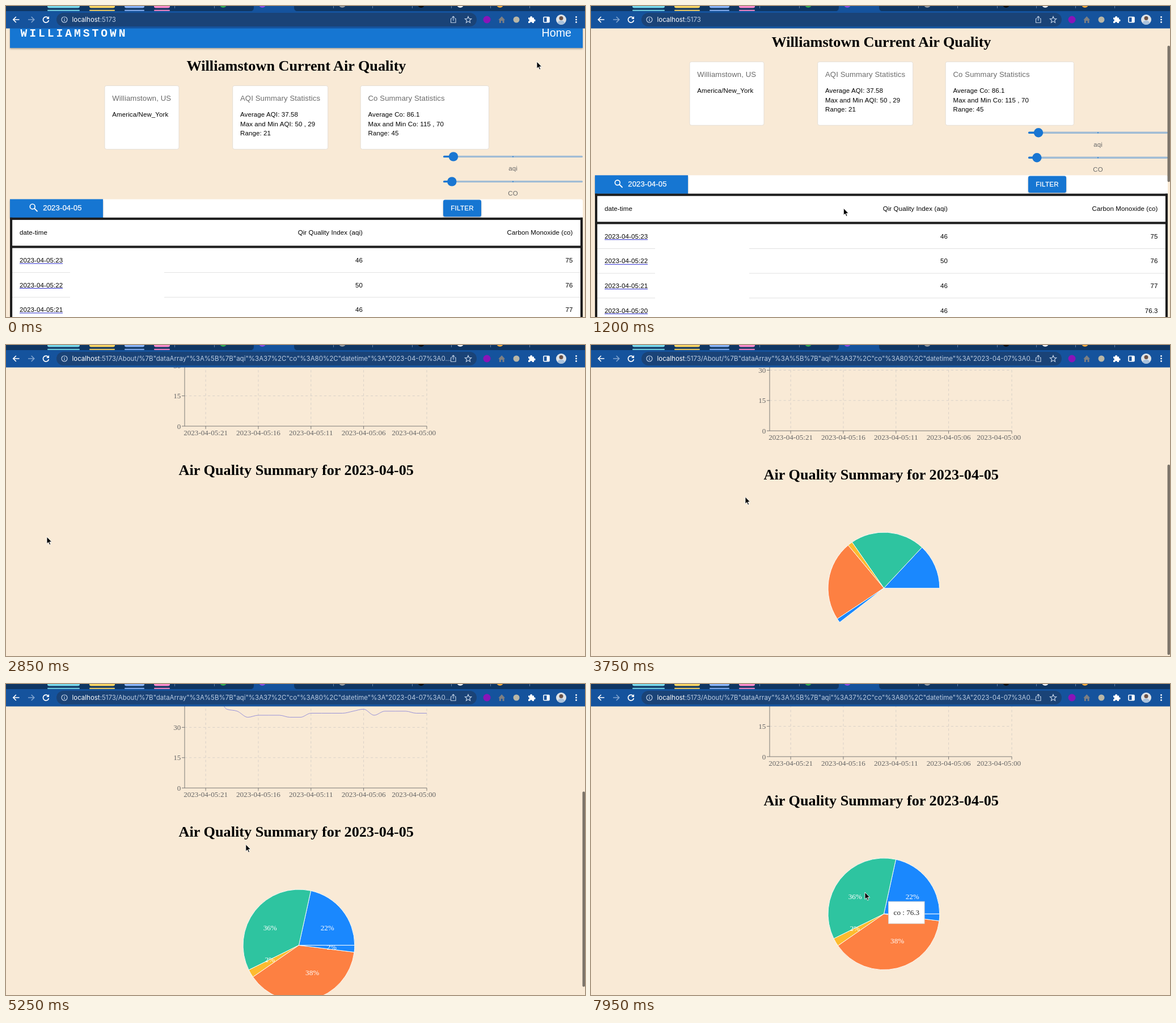
An HTML page that plays this animation: 1021 by 548 pixels, repeating every 8000 ms.

```html
<!DOCTYPE html>
<html lang="en">
<head>
<meta charset="utf-8">
<title>Air quality dashboard</title>
<style>
html, body { margin: 0; width: 100%; height: 100%; overflow: hidden; background: #f9ead6; }
svg { display: block; width: 1021px; height: 548px; overflow: hidden; }
.sans { font-family: "Liberation Sans", Arial, sans-serif; }
.body { font-size: 11.48px; letter-spacing: .01071em; }
.sub { font-size: 13.12px; letter-spacing: .00938em; }
.mute { fill: #6a6a6a; }
.serif { font-family: "Liberation Serif", Times, serif; font-size: 13.12px; }
.head { font-size: 26.24px; font-weight: 700; text-anchor: middle; }
.brand { font: 700 19.68px "Courier New", "Liberation Mono", monospace; letter-spacing: 3.94px; fill: #fff; }
.url { font: 11.5px Inter, sans-serif; fill: #b9cbe2; white-space: pre; }
.end { text-anchor: end; }
.mid { text-anchor: middle; }
</style>
</head>
<body>
<svg id="stage" viewBox="0 0 1021 548" xmlns="http://www.w3.org/2000/svg"></svg>
<script>
const LOOP = 8000, STEP = 150, BLUE = '#1976d2';
const stage = document.getElementById('stage');

const rect = (x, y, w, h, fill, more = '') =>
  `<rect x="${x}" y="${y}" width="${w}" height="${h}" fill="${fill}" ${more}/>`;
const circle = (x, y, r, fill, more = '') =>
  `<circle cx="${x}" cy="${y}" r="${r}" fill="${fill}" ${more}/>`;
const path = (d, stroke, width, more = '') =>
  `<path d="${d}" stroke="${stroke}" stroke-width="${width}" fill="none" ${more}/>`;
const text = (x, y, str, cls, more = '') =>
  `<text x="${x}" y="${y}" class="${cls}" ${more}>${str}</text>`;

// ---- browser frame ----
function browser() {
  let s = rect(0, 0, 1021, 10, '#0f3663') + rect(0, 9, 1021, 30.5, '#15539d');
  s += `<path d="M430 9.5Q437 9 437 3V0H508V3Q508 9 515 9.5Z" fill="#15539d"/>`;
  const groups = [[73, 57, '#78d9ec'], [147, 45, '#fdd663'], [209, 35, '#8ab4f8'], [261, 28, '#ff8bcb']];
  for (const [x, w, c] of groups)
    s += rect(x, -6, w, 9.5, c, 'rx="3"') + rect(x, 6.8, w, 2, c, 'rx="1"');
  for (const x of [297, 367, 577, 646, 716, 785, 854, 923]) s += rect(x, 0, 1, 4, '#5f7fa6');
  const icons = [[383, '#2fa84f'], [452, '#8a4be0'], [593, '#8d959e'], [732, '#0a0a0a'], [801, '#e8eaed'], [871, '#f2a83b']];
  for (const [x, c] of icons) s += circle(x, -3, 6, c);

  s += rect(89, 12, 741, 24, '#1a4377', 'rx="12"');
  s += path('M23.5 24H13M17.8 19L12.8 24L17.8 29', '#fff', 1.7);
  s += path('M39 24H49.5M44.7 19L49.7 24L44.7 29', '#7fa3cf', 1.7);
  s += path('M74.4 21A5 5 0 1 0 75.4 25', '#fff', 1.7) + `<path d="M76 18V23H71Z" fill="#fff"/>`;
  s += circle(103, 24, 5, 'none', 'stroke="#c3d3e8" stroke-width="1.2"') + path('M103 23.3V26.8M103 21V22.3', '#c3d3e8', 1.3);
  s += `<text id="url" x="116.5" y="28" class="url"></text>`;

  const pale = '#c3d3e8';
  s += path('M786.5 22.3H784.5V29.3H793V22.3H791M788.75 26V18.5M786.3 20.7L788.75 18.3L791.2 20.7', pale, 1.1);
  s += path('M815 18.6L816.6 22.3L820.6 22.6L817.6 25.3L818.5 29.2L815 27.1L811.5 29.2L812.4 25.3L809.4 22.6L813.4 22.3Z', pale, 1.2);
  s += circle(848, 24, 6.5, '#8a14b8');
  s += `<path d="M868.3 24.4L874.2 18.3L880 24.4H878.5V30H875.6V26H872.8V30H869.9V24.4Z" fill="#7d7f83"/>`;
  s += circle(900, 24, 5.5, '#b9b6a6');
  s += `<path d="M921 20.5H924.2A2 2 0 1 1 928 20.5H931V23.4A2 2 0 1 1 931 27.2V30H927.9A1.9 1.9 0 0 0 924.1 30H921V27A1.9 1.9 0 0 0 921 23.2Z" fill="#fff"/>`;
  s += rect(948, 19.5, 10, 9.2, 'none', 'stroke="#fff" stroke-width="1.6" rx="1"') + rect(953.5, 19.5, 4.5, 9, '#fff');
  s += `<clipPath id="face"><circle cx="979" cy="24" r="9"/></clipPath><g clip-path="url(#face)">`
    + rect(970, 15, 18, 18, '#dfe3e6') + circle(979, 21.5, 3.5, '#6b5248')
    + `<ellipse cx="979" cy="32" rx="7" ry="6.5" fill="#a9c2dc"/></g>`;
  for (const y of [19.5, 24, 28.5]) s += circle(1005.5, y, 1.4, '#fff');
  return s;
}

// ---- table page ----
function card(x, w, title, lines) {
  return rect(x, 165, w, 112, '#fff', 'rx="3.3" stroke="#e2dcd3" stroke-width=".9"')
    + text(x + 13.3, 192, title, 'sans sub mute')
    + lines.map((l, i) => text(x + 13.3, 220 + i * 16.4, l, 'sans body')).join('');
}
function slider(y, thumb, label) {
  return rect(771, y - 1.65, 246, 3.3, BLUE, 'rx="1.6" opacity=".4"')
    + rect(771, y - 1.65, thumb - 771, 3.3, BLUE, 'rx="1.6"')
    + circle(894, y, .9, BLUE) + circle(thumb, y, 8.2, BLUE)
    + text(894, y + 24.5, label, 'sans body mid mute');
}
function tablePage() {
  let s = rect(7, 46, 1010, 52.5, BLUE, 'filter="url(#lift)"')
    + text(25.5, 79, 'WILLIAMSTOWN', 'brand')
    + text(997, 79, 'Home', 'sans end', 'font-size="19.68" fill="#fff"')
    + text(512, 139, 'Williamstown Current Air Quality', 'serif head');
  s += card(174, 131, 'Williamstown, US', ['America/New_York']);
  s += card(399.7, 168, 'AQI Summary Statistics', ['Average AQI: 37.58', 'Max and Min AQI: 50 , 29', 'Range: 21']);
  s += card(625.2, 226.3, 'Co Summary Statistics', ['Average Co: 86.1', 'Max and Min Co: 115 , 70', 'Range: 45']);
  s += slider(290, 789, 'aqi') + slider(334, 786.3, 'CO');

  s += rect(7, 365, 1010, 700, '#fff', 'rx="3.3"');
  s += rect(7, 365, 164, 32.6, BLUE, 'filter="url(#lift)"')
    + circle(46.7, 378, 4.4, 'none', 'stroke="#fff" stroke-width="1.7"')
    + path('M49.8 381L55.5 386.7', '#fff', 1.9)
    + text(65.3, 385, '2023-04-05', 'sans sub', 'fill="#fff" stroke="#fff" stroke-width=".25"');
  s += rect(771, 366.2, 67, 29.6, BLUE, 'rx="3.3" filter="url(#lift)"')
    + text(804.5, 385, 'FILTER', 'sans mid', 'font-size="11.48" letter-spacing=".3" fill="#fff" stroke="#fff" stroke-width=".3"');

  const ink = '#1e1e1e';
  s += text(24, 428, 'date-time', 'sans body')
    + text(629, 428, 'Qir Quality Index (aqi)', 'sans body end')
    + text(999.5, 428, 'Carbon Monoxide (co)', 'sans body end');
  const rows = [[23, 46, 75], [22, 50, 76], [21, 46, 77], [20, 46, 76.3], [19, 39, 75.7], [18, 38, 75], [11, 37, 79.7], [10, 37, 80.3]];
  rows.forEach(([hour, aqi, co], i) => {
    const y = 451 + i * 43.55;
    s += text(24, y + 25.6, '2023-04-05:' + hour, 'sans body')
      + rect(24, y + 27, 76, .9, '#1515c8')
      + text(629, y + 25.6, aqi, 'sans body end') + text(999.5, y + 25.6, co, 'sans body end')
      + rect(11, y + 42.8, 102, .9, '#dedede') + rect(279, y + 42.8, 734, .9, '#dedede');
  });
  return s + rect(7, 397.4, 1010, 4.1, ink) + rect(7, 447, 1010, 4.1, ink)
    + rect(7, 397.4, 4.1, 650, ink) + rect(1012.9, 397.4, 4.1, 650, ink);
}

// ---- chart page ----
const AXIS = { x: 315, y: 410, w: 427, unit: 3.56 };
const hourly = [46, 50, 46, 46, 39, 38, 35, 36, 36, 36, 35, 35, 37, 37, 37, 37, 38, 39, 36, 38, 38, 38, 37, 37];

function monotone(vals) {
  const n = vals.length, h = AXIS.w / (n - 1);
  const ys = vals.map(v => AXIS.y - v * AXIS.unit);
  const slope = i => (ys[i + 1] - ys[i]) / h;
  const m = ys.map((_, i) => {
    if (i === 0 || i === n - 1) return slope(i ? n - 2 : 0);
    const a = slope(i - 1), b = slope(i);
    return (Math.sign(a) + Math.sign(b)) * Math.min(Math.abs(a), Math.abs(b), Math.abs(a + b) / 4);
  });
  let d = `M${AXIS.x} ${ys[0]}`;
  for (let i = 1; i < n; i++) {
    const x = AXIS.x + i * h;
    d += `C${x - h * 2 / 3} ${ys[i - 1] + m[i - 1] * h / 3} ${x - h / 3} ${ys[i] - m[i] * h / 3} ${x} ${ys[i]}`;
  }
  return d;
}
function chartPage() {
  const { x, y, w, unit } = AXIS, step = w / 23, dash = 'stroke-dasharray="4.1 4.1"';
  let s = '';
  for (let v = 0; v <= 60; v += 15) {
    const ty = y - v * unit;
    if (v) s += path(`M${x} ${ty}H${x + w}`, '#d3cdc6', .85, dash);
    s += path(`M${x - 5} ${ty}H${x}`, '#666', .85) + text(x - 6.6, ty + 4.6, v, 'serif end', 'fill="#666"');
  }
  for (const hour of [21, 16, 11, 6, 0]) {
    const tx = x + (23 - hour) * step;
    s += path(`M${tx} ${y - 60 * unit}V${y}`, '#d3cdc6', .85, dash) + path(`M${tx} ${y}v5`, '#666', .85);
    s += text(Math.min(tx, 719.2), y + 16, '2023-04-05:' + String(hour).padStart(2, '0'), 'serif mid', 'fill="#666"');
  }
  s += path(`M${x} ${y - 60 * unit}V${y}H${x + w}`, '#666', .85) + path(monotone(hourly), '#8884d8', .85);
  s += text(511.8, 495.5, 'Air Quality Summary for 2023-04-05', 'serif head');
  return s + '<g id="pie"></g>';
}

const PIE = { x: 516.4, y: 687.2, r: 98.4 };
const parts = [[46, '#1a88fe'], [76.3, '#2ec4a0'], [5, '#fdbb2f'], [82, '#fd8042'], [4.2, '#1a88fe']];
const total = parts.reduce((sum, p) => sum + p[0], 0);
const onPie = (angle, r) => [PIE.x + r * Math.cos(angle), PIE.y - r * Math.sin(angle)];
let turn = 0;
const slices = parts.map(([value, color]) => {
  const from = turn;
  turn += value / total * 2 * Math.PI;
  return { from, to: turn, color, label: Math.round(value / total * 100) + '%', mid: onPie((from + turn) / 2, PIE.r / 2) };
});
function pie(grow, labels) {
  if (grow <= 0) return '';
  let s = '';
  for (const { from, to, color } of slices) {
    const [ax, ay] = onPie(from * grow, PIE.r), [bx, by] = onPie(to * grow, PIE.r);
    const big = (to - from) * grow > Math.PI ? 1 : 0;
    s += `<path d="M${PIE.x} ${PIE.y}L${ax} ${ay}A${PIE.r} ${PIE.r} 0 ${big} 0 ${bx} ${by}Z" fill="${color}" stroke="#fff" stroke-width=".9"/>`;
  }
  if (labels) for (const { mid: [x, y], label } of slices)
    s += text(x, y + 4.4, label, x > PIE.x ? 'serif' : 'serif end', 'fill="#fff"');
  return s;
}

// ---- motion ----
function ease(t) {
  if (t <= 0) return 0;
  if (t >= 1) return 1;
  let lo = 0, hi = 1, u;
  const bez = (a, b) => 3 * (1 - u) * (1 - u) * u * a + 3 * (1 - u) * u * u * b + u * u * u;
  for (let i = 0; i < 24; i++) {
    u = (lo + hi) / 2;
    if (bez(.25, .25) < t) lo = u; else hi = u;
  }
  return bez(.1, 1);
}
function track(keys, t) {
  if (t <= keys[0][0]) return keys[0].slice(1);
  for (let i = 1; i < keys.length; i++) {
    const [a, b] = [keys[i - 1], keys[i]];
    if (t <= b[0]) {
      const k = (t - a[0]) / (b[0] - a[0]);
      return a.slice(1).map((v, j) => v + (b[j + 1] - v) * k);
    }
  }
  return keys[keys.length - 1].slice(1);
}
const scrollKeys = [[0, 24.6], [450, 0], [1050, 0], [1650, 267], [3600, 267], [4350, 226], [4800, 190], [4950, 190], [5700, 282]];
const pointerKeys = [
  [0, 936, 98], [900, 545.5, 361], [1050, 520, 360], [1950, 72, 338], [3150, 72, 338], [3900, 322, 250],
  [4350, 340, 243], [4800, 350, 240], [4950, 350, 240], [6000, 605, 389], [6150, 565, 466], [6300, 525.5, 448],
  [6600, 525.5, 448], [7350, 556, 365], [7650, 556, 365], [7950, 483, 367]
];
const OPEN = 2700, GROW = 3225;
const hovers = [[6750, 3, 'o3 : 82'], [7020, 0, 'aqi : 46'], [7832, 1, 'co : 76.3']];

stage.innerHTML = `<defs><filter id="lift" x="-5%" y="-20%" width="110%" height="160%">
  <feDropShadow dx="0" dy="1.8" stdDeviation="1.8" flood-color="#000" flood-opacity=".32"/></filter></defs>`
  + rect(0, 0, 1021, 548, '#f9ead6')
  + `<g id="table">${tablePage()}</g><g id="chart">${chartPage()}</g>`
  + `<g id="tip">${rect(0, 0, 63, 39, '#fff', 'id="tipBox" stroke="#ccc" stroke-width=".9"')}${text(9, 23.6, '', 'serif', 'id="tipText" fill="#222"')}</g>`
  + rect(1016.5, 0, 4.5, 0, '#000', 'id="bar" rx="2"')
  + browser()
  + `<g id="arrow"><path d="M0 0V12.3L2.8 9.7L4.7 14.2L6.7 13.3L4.8 9H8.7Z" fill="#000" stroke="#fff" stroke-width=".9"/></g>`
  + `<g id="hand"><path d="M2.4 7.6V1.4Q3.6-.4 4.6 1.4V5.2Q5.8 4 6.8 5.4Q8 4.4 9 5.9Q10.6 5.2 11 7V10.6L9.6 15.2H4L.2 10.2Q-1.6 7.4.2 7.3L2.4 9.4Z" fill="#fff" stroke="#000" stroke-width="1"/><path d="M5 10V13M6.8 10V13M8.6 10V13" stroke="#000" stroke-width=".7"/></g>`;
const el = {};
for (const node of stage.querySelectorAll('[id]')) el[node.id] = node;

const show = (node, on) => node.setAttribute('display', on ? 'inline' : 'none');
const move = (node, x, y) => node.setAttribute('transform', `translate(${x} ${y})`);
const HOST = '<tspan fill="#fff">localhost</tspan>:5173';
const DEEP = HOST + '/About/%7B"dataArray"%3A%5B%7B"aqi"%3A37%2C"co"%3A80%2C"datetime"%3A"2023-04-07%3A0...';
let address = '';

function drawTip(t, scroll) {
  const n = hovers.filter(h => h[0] <= t).length - 1;
  show(el.tip, n >= 0);
  if (n < 0) return;
  const [start, slice, label] = hovers[n];
  const from = slices[hovers[Math.max(0, n - 1)][1]].mid, to = slices[slice].mid;
  const k = ease((t - start) / 400);
  const at = i => from[i] + (to[i] - from[i]) * k + 8.6;
  move(el.tip, at(0), at(1) - scroll);
  el.tipText.textContent = label;
  el.tipBox.setAttribute('width', el.tipText.getComputedTextLength() + 18);
}
function drawBar(t, scroll, second) {
  const on = second ? t > 3600 && t < 6000 : t > 1050 && t < 2100;
  show(el.bar, on);
  const top = 39 + scroll * (second ? .664 : .464);
  el.bar.setAttribute('y', top);
  el.bar.setAttribute('height', Math.min(second ? 344 : 240, 546 - top));
  el.bar.setAttribute('opacity', !second && t >= 1950 ? .25 : .5);
}
function draw(time) {
  const t = Math.floor(time % LOOP / STEP) * STEP;
  const second = t >= OPEN;
  const [scroll] = track(scrollKeys, t), [px, py] = track(pointerKeys, t);
  show(el.table, !second);
  show(el.chart, second);
  move(second ? el.chart : el.table, 0, -scroll);
  const want = second ? DEEP : HOST;
  if (want !== address) el.url.innerHTML = address = want;
  el.pie.innerHTML = pie(ease((t - GROW) / 1500), t >= 4800);
  drawTip(t, scroll);
  drawBar(t, scroll, second);
  const link = t >= 1950 && t < 2850;
  show(el.hand, link);
  show(el.arrow, !link);
  move(el.hand, px - 1.5, py + .5);
  move(el.arrow, px, py);
}
const begin = performance.now();
function tick() {
  draw(performance.now() - begin);
  requestAnimationFrame(tick);
}
tick();
</script>
</body>
</html>
```
